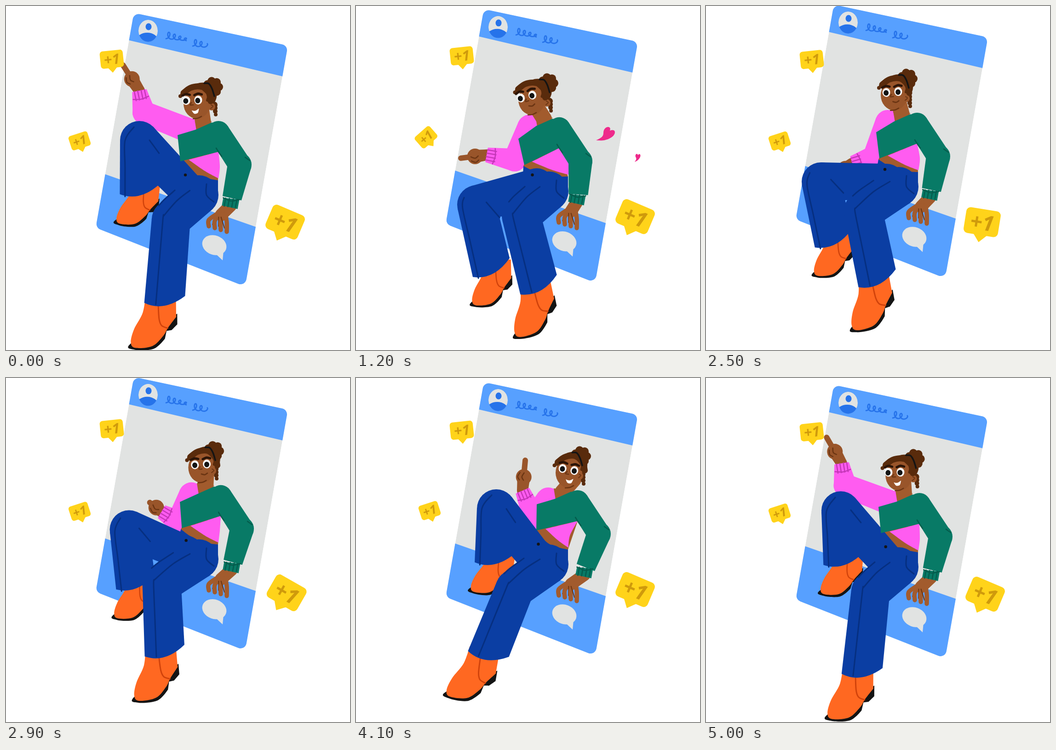
These frames come from a looping animation (748 by 748 pixels, 5100 ms). An HTML page with a canvas:

```html
<!DOCTYPE html>
<html lang="en">
<head>
<meta charset="utf-8">
<title>Stepping out of the feed</title>
<style>
html, body { margin: 0; width: 100%; height: 100%; overflow: hidden; background: #fff; }
canvas { display: block; width: 100vw; height: 100vh; }
</style>
</head>
<body>
<canvas id="stage" width="748" height="748"></canvas>
<script>
const ctx = document.getElementById('stage').getContext('2d');
const LOOP = 5100, STEP = 100, TAU = Math.PI * 2, DEG = Math.PI / 180;
const C = {
  blue: '#57a0ff', ink: '#2673ea', grey: '#e1e3e2', yellow: '#ffd31a', gold: '#cf9a0c',
  jeans: '#0b3ea3', seam: '#062f80', green: '#087a66', pine: '#045c4c', pink: '#ff5cf0',
  plum: '#c436b8', skin: '#a25b2d', face: '#99552a', crease: '#6b3513', hair: '#592b0c',
  dark: '#2b1407', black: '#141414', boot: '#ff6821', stitch: '#d1430b', heart: '#ee2a8b'
};

// ---- key joints, relative to the card; everything else follows from them ----
const tracks = {};
function pose(time, joints) {
  for (const name in joints) (tracks[name] ??= []).push([time, joints[name]]);
}
// head: x, sideways turn, tilt in degrees
pose(0, {
  chest: [462], head: [415, -10, -2], elbow: [300, 232], wrist: [290, 184], tip: [254, 128],
  nearHem: [345, 638], farKnee: [290, 292], farHem: [291, 398]
});
pose(500, { farKnee: [258, 355], farHem: [172, 482] });
pose(1200, {
  chest: [442], head: [382, -11, -14], elbow: [345, 343], wrist: [284, 332], tip: [228, 339],
  nearHem: [397, 614], farKnee: [262, 440], farHem: [294, 577]
});
pose(2000, {
  chest: [448], head: [392, -11, -12], elbow: [362, 348], wrist: [312, 368], tip: [270, 400],
  nearHem: [397, 608], farKnee: [266, 448], farHem: [286, 586]
});
pose(2500, {
  chest: [459], head: [409, -4, -4], elbow: [366, 346], wrist: [318, 360], tip: [285, 386],
  nearHem: [372, 610], farKnee: [250, 400], farHem: [277, 523]
});
pose(3300, {
  chest: [474], head: [441, -1, -3], elbow: [383, 314], wrist: [357, 259], tip: [340, 196],
  nearHem: [319, 610], farKnee: [292, 302], farHem: [289, 410]
});
pose(4100, {
  chest: [482], head: [463, -1, 10], elbow: [387, 311], wrist: [362, 251], tip: [368, 185],
  nearHem: [288, 606], farKnee: [305, 290], farHem: [302, 397]
});

// Periodic cubic interpolation that stays flat at turning points.
function sample(name, t) {
  const keys = tracks[name], n = keys.length;
  const keyAt = i => {
    const turn = Math.floor(i / n), [time, values] = keys[i - turn * n];
    return [time + turn * LOOP, values];
  };
  let i = n - 1;
  while (keys[i][0] > t) i--;
  const [a, b, c, d] = [-1, 0, 1, 2].map(k => keyAt(i + k));
  const span = c[0] - b[0], u = (t - b[0]) / span, v = 1 - u;
  const slope = (p, q, r, j) =>
    (q[1][j] - p[1][j]) * (r[1][j] - q[1][j]) > 0 ? (r[1][j] - p[1][j]) * span / (r[0] - p[0]) : 0;
  return b[1].map((from, j) =>
    from * (1 + 2 * u) * v * v + slope(a, b, c, j) * u * v * v +
    c[1][j] * u * u * (3 - 2 * u) - slope(b, c, d, j) * u * u * v);
}

// ---- helpers ----
const mix = (a, b, k) => [a[0] + (b[0] - a[0]) * k, a[1] + (b[1] - a[1]) * k];
const add = (a, x, y) => [a[0] + x, a[1] + y];
const along = (a, dir, k) => [a[0] + dir[0] * k, a[1] + dir[1] * k];
const normal = dir => [-dir[1], dir[0]];
function unit(a, b) {
  const dx = b[0] - a[0], dy = b[1] - a[1], len = Math.hypot(dx, dy) || 1;
  return [dx / len, dy / len];
}
function curve(pts, corners, closed) {
  const n = pts.length;
  const at = i => closed ? pts[(i + n) % n] : pts[Math.max(0, Math.min(n - 1, i))];
  const handle = (i, sign) => {
    const k = corners.includes(i % n) ? 0 : sign / 6;
    return add(at(i), (at(i + 1)[0] - at(i - 1)[0]) * k, (at(i + 1)[1] - at(i - 1)[1]) * k);
  };
  ctx.beginPath();
  ctx.moveTo(...pts[0]);
  for (let i = 0; i < (closed ? n : n - 1); i++)
    ctx.bezierCurveTo(...handle(i, 1), ...handle(i + 1, -1), ...at(i + 1));
}
function blob(pts, color, corners = []) {
  curve(pts, corners, true);
  ctx.fillStyle = color;
  ctx.fill();
}
function line(pts, color, width) {
  curve(pts, [], false);
  ctx.strokeStyle = color;
  ctx.lineWidth = width;
  ctx.stroke();
}
function poly(pts, color) {
  ctx.beginPath();
  pts.forEach(p => ctx.lineTo(...p));
  ctx.closePath();
  ctx.fillStyle = color;
  ctx.fill();
}
function oval(x, y, rx, ry, color, turn = 0) {
  ctx.beginPath();
  ctx.ellipse(x, y, rx, ry, turn, 0, TAU);
  ctx.fillStyle = color;
  ctx.fill();
}
const dot = (p, r, color) => oval(...p, r, r, color);
// Tapering limb segment: round at a, flat at b.
function limb(a, ra, b, rb, color) {
  const n = normal(unit(a, b));
  dot(a, ra, color);
  poly([along(a, n, ra), along(b, n, rb), along(b, n, -rb), along(a, n, -ra)], color);
}
function placed(x, y, degrees, scale, draw) {
  ctx.save();
  ctx.translate(x, y);
  ctx.rotate(degrees * DEG);
  ctx.scale(scale, scale);
  draw();
  ctx.restore();
}

// ---- scenery ----
function scrawl(x, y, humps) {
  const pts = [];
  for (let u = 0; u <= humps; u += .1)
    pts.push([x + 12 * u + 5 * Math.sin(TAU * u), y + 2.7 * u + (8 - 1.5 * u) * Math.cos(TAU * u)]);
  line(pts, C.ink, 2.8);
}
function card() {
  ctx.save();
  const corners = [[278, 15], [613, 86], [520, 610], [195, 482]];
  ctx.beginPath();
  ctx.moveTo(...mix(corners[3], corners[0], .5));
  corners.forEach((p, i) => ctx.arcTo(...p, ...corners[(i + 1) % 4], 13));
  ctx.closePath();
  ctx.clip();
  ctx.fillStyle = C.grey;
  ctx.fill();
  poly([[150, -40], [700, -40], [700, 176], [150, 47]], C.blue);
  poly([[150, 343], [700, 535], [700, 700], [150, 700]], C.blue);
  scrawl(348, 63, 4);
  scrawl(406, 79, 2.5);
  oval(453, 520, 27, 21, C.grey, .35);
  poly([[457, 540], [473, 532], [471, 553]], C.grey);
  ctx.beginPath();
  ctx.ellipse(309, 54, 21, 24, 0, 0, TAU);
  ctx.clip();
  ctx.fillStyle = C.grey;
  ctx.fill();
  oval(307, 76, 24, 18, C.ink);
  oval(310, 45, 6.5, 7.5, C.ink);
  ctx.restore();
}
function badge(x, y, degrees, scale) {
  placed(x, y, degrees, scale, () => {
    ctx.fillStyle = C.yellow;
    ctx.beginPath();
    ctx.roundRect(-36, -27, 72, 54, 9);
    ctx.fill();
    poly([[-15, 25], [15, 25], [-1, 42]], C.yellow);
    ctx.fillStyle = C.gold;
    ctx.font = 'italic 600 44px "Noto Sans", sans-serif';
    ctx.textAlign = 'center';
    ctx.fillText('+1', 0, 16);
  });
}
function badges(t) {
  const bob = peak => Math.cos(TAU * (t - peak) / (LOOP / 2)) - 1;
  const pulse = (center, width) => Math.exp(-(((t - center) / width) ** 2));
  const left = pulse(1250, 280);
  const right = pulse(2550, 190) - .9 * pulse(3050, 190);
  badge(230, 119 + 6.5 * bob(2120), -6, .7);
  badge(160 - 8 * left, 294 + 4.5 * bob(2300), -18 - 24 * left, .6);
  badge(607 - 7 * right, 470 + 6 * bob(2480), 23 - 15 * right, 1.05);
}
function heart(x, y, degrees, scale) {
  placed(x, y, degrees, scale, () => {
    ctx.beginPath();
    ctx.moveTo(-21, 14);
    ctx.bezierCurveTo(-10, 9, -5, 6, -5, -2);
    ctx.bezierCurveTo(-5, -18, 14, -19, 9, -7);
    ctx.bezierCurveTo(24, -13, 23, 3, 10, 9);
    ctx.bezierCurveTo(0, 15, -10, 15, -21, 14);
    ctx.fillStyle = C.heart;
    ctx.fill();
  });
}
function hearts(t) {
  const age = (t - 900) / 800;
  if (age <= 0 || age >= 1) return;
  const size = Math.min(1, 2 * Math.sin(Math.PI * age)), rise = (1200 - t) * .04;
  heart(543, 278 + rise, 0, size);
  heart(611, 329 + rise, -30, .45 * size);
}

// ---- figure ----
function boot(ankle, degrees, scale) {
  placed(...ankle, degrees, scale, () => {
    blob([[-61, 82], [-54, 96], [-12, 93], [12, 70], [15, 53], [26, 51], [38, 38], [37, 15]], C.black, [3, 4, 5, 6, 7]);
    blob([[-33, -24], [-38, 15], [-56, 52], [-62, 80], [-52, 92], [-15, 87], [8, 64], [18, 46], [35, 22], [33, -24]], C.boot, [0, 8, 9]);
    line([[-5, -4], [-2, 28], [4, 42], [17, 47]], C.stitch, 3);
  });
}
function bootUnder(knee, hem, shift, reach, turn, scale) {
  const shin = unit(knee, hem);
  const degrees = Math.atan2(-shin[0], shin[1]) / DEG;
  boot(add(along(hem, shin, reach), shift, 0), .6 * degrees + turn, scale);
}
// seamAt: how far towards the front edge the seam runs, 0 to 1
function leg(hip, hipRadius, knee, hem, seamAt) {
  const radius = 42, half = 45;
  const thighFront = normal(unit(hip, knee)), shin = unit(knee, hem), front = normal(shin);
  const slant = -14 * DEG, cos = Math.cos(slant), sin = Math.sin(slant);
  const edge = [front[0] * cos - front[1] * sin, front[0] * sin + front[1] * cos];
  const hemFront = along(hem, edge, half), hemBack = along(hem, edge, -half);
  const kneeBack = along(knee, front, -radius);

  limb(hip, hipRadius, knee, radius, C.jeans);
  dot(knee, radius, C.jeans);
  ctx.beginPath();
  ctx.moveTo(...along(knee, front, radius));
  ctx.lineTo(...hemFront);
  ctx.quadraticCurveTo(...along(hem, shin, 28), ...hemBack);
  ctx.lineTo(...kneeBack);
  ctx.fillStyle = C.jeans;
  ctx.fill();

  const offset = radius * seamAt;
  const bend = unit([0, 0], add(thighFront, ...front));
  line([along(knee, bend, offset), along(knee, front, offset),
    mix(along(knee, front, offset), along(hem, edge, half * seamAt), .5),
    along(along(hem, edge, half * seamAt), shin, 8)], C.seam, 3);
  return { thighFront, bend, kneeBack, hemBack, front, offset };
}
function farLeg(hip, knee, hem) {
  const { front, kneeBack, hemBack } = leg(hip, 38, knee, hem, .74);
  line([along(knee, front, -22), mix(kneeBack, hemBack, .3)], C.seam, 3);
}
function nearLeg(hip, waist, side, knee, hem) {
  const belt = add(mix(waist, side, .5), -3, 9);
  blob([waist, belt, side, add(hip, 42, 0), add(hip, 0, 40), add(hip, -58, 15)], C.jeans, [0, 2, 3, 4, 5]);
  const { thighFront, bend, offset } = leg(hip, 43, knee, hem, .42);
  const thighAt = (k, d) => along(mix(hip, knee, k), thighFront, d);
  line([thighAt(.1, 20), thighAt(.55, 22), along(knee, bend, offset)], C.seam, 3);
  line([thighAt(.4, 42), thighAt(.8, 42), along(knee, thighFront, 40)], C.seam, 3);
  line([add(side, -25, 8), add(side, -25, 32), add(side, -9, 47)], C.seam, 3);
  dot(add(belt, -26, -1), 3.2, C.black);
}
function ribs(a, b, dir, length, color) {
  [.15, .38, .62, .85].forEach(k => line([mix(a, b, k), along(mix(a, b, k), dir, length)], color, 2.5));
}
function farArm(shoulder, elbow, wrist, tip) {
  const point = unit(wrist, tip), across = normal(point), fist = mix(wrist, tip, .45);
  limb(wrist, 12, fist, 14, C.face);
  dot(fist, 17, C.face);
  line([fist, mix(fist, tip, .5), tip], C.face, 12);
  [-9, 0].forEach(k => {
    const knuckle = along(fist, across, k);
    line([along(knuckle, point, 9), along(knuckle, across, -4), along(knuckle, point, -7)], C.crease, 2.5);
  });
  limb(shoulder, 27, elbow, 25, C.pink);
  limb(elbow, 25, wrist, 16, C.pink);
  const up = unit(wrist, elbow), side = normal(up);
  ribs(along(wrist, side, 16), along(wrist, side, -16), up, 20, C.plum);
  const inner = along(wrist, up, 16);
  line([along(inner, side, 17), along(inner, up, 3), along(inner, side, -17)], C.plum, 2.5);
}
function nearHand(cuff, palm) {
  line([add(cuff, -3, 16), palm], C.skin, 27);
  for (let i = 0; i < 4; i++) {
    const x = -27 + 13 * i, y = 25 + 4 * i;
    line([add(palm, -9 + 6 * i, -2), add(palm, x, y * .45), add(palm, x, y)], C.skin, 9.5);
    if (i < 3) line([add(palm, x * .4, 5), add(palm, x + 8, y - 4)], C.crease, 2);
  }
}
function wrapTop(chest, waist, cuff, palm) {
  const elbow = add(chest, 46, 71), armpit = add(chest, 0, 43);
  nearHand(cuff, palm);
  limb(chest, 24, elbow, 25, C.green);
  limb(elbow, 26, cuff, 21, C.green);
  poly([[chest[0] - 89, waist[1] - 59], add(chest, -50, -5), add(chest, -14, -21), add(chest, 10, 10),
    armpit, add(waist, 2, -2)], C.green);
  const left = add(cuff, -19, -1), right = add(cuff, 16, 3), down = [-.18, .98];
  poly([left, right, along(right, down, 21), along(left, down, 17)], C.green);
  ribs(left, right, down, 18, C.pine);
  line([left, add(cuff, -2, 6), right], C.pine, 2.5);
  line([add(armpit, -5, -8), armpit, add(armpit, 7, 10)], C.pine, 2.5);
  line([add(elbow, 12, -16), add(elbow, 22, -9)], C.pine, 2.5);
}
function belly(chest, waist, hip, side) {
  const armpit = add(chest, 0, 43), hem = mix(waist, armpit, .24);
  poly([add(waist, 2, -4), armpit, side, hip, waist], C.skin);
  blob([hem, armpit, add(side, 4, -30), add(side, 1, -4), mix(hem, side, .55)], C.pink, [0, 1, 3]);
}
function head(x, turn, tilt, chest, t) {
  const o = [x, 209], bun = add(o, 25 - turn, -33), eyes = add(o, turn, -4);
  const at = (dx, dy) => add(o, dx, dy);
  poly([add(chest, -52, -28), add(chest, -14, -23), add(chest, -48, -3)], C.skin);
  line([at(10, 18), add(chest, -33, -20)], C.skin, 34);
  for (let i = 0; i < 7; i++)
    dot(add(bun, 13 * Math.cos(i / 7 * TAU), 13 * Math.sin(i / 7 * TAU)), 9, C.hair);
  dot(bun, 15, C.hair);
  oval(...add(mix(o, bun, .35), 0, -3), 31, 28, C.hair);
  for (let i = 0; i < 4; i++) dot(at(28 - turn + i, 6 + 7 * i), 7 - i, C.hair);
  oval(...at(0, 3), 29, 33, C.face);
  line([at(-8, 36), at(2, 35), at(10, 31)], C.crease, 2.5);
  dot(at(22 - turn, 10), 8, C.face);
  line([at(21 - turn, 6), at(25 - turn, 9), at(20 - turn, 14)], C.crease, 2);

  const slide = (turn + 10) * .5;
  line([at(slide - 29, -20), at(slide - 14, -31), at(slide + 6, -34), at(slide + 24, -26), at(slide + 30, -2)], C.hair, 13);
  for (let i = 0; i < 4; i++) dot(at(slide - 36 + 5 * i, -13 - 4 * i), 4 + i % 2, C.hair);
  line([at(slide + 14, -28), at(slide + 25, -16), at(slide + 23, -4)], C.hair, 6);
  line([add(bun, -19, -8), add(bun, -9, -7), add(bun, -2, 4), add(bun, 3, 20)], C.black, 3.5);

  const blink = t >= 3200 && t < 3450, grin = t < 600 || t >= 3700;
  placed(...eyes, tilt, 1, () => {
    [-13, 13].forEach(x => {
      const lift = blink ? 5 : 0;
      if (blink) line([[x - 8, -1], [x, 2], [x + 8, -1]], C.dark, 2.5);
      else {
        oval(x, 0, 8.5, 9.5, '#fff');
        oval(x + turn * .12, 1, 5.5, 6, C.black);
      }
      line([[x - 8, -11 + lift], [x, -14 + lift], [x + 8, -12 + lift]], C.dark, 5);
    });
    line([[-2, 5], [-5, 10], [2, 10]], C.crease, 2.5);
    if (grin) blob([[-2, 22], [6, 23], [14, 18], [11, 28], [3, 29]], '#fff', [0, 2]);
    else line([[0, 21], [7, 23], [13, 20]], C.crease, 2.8);
  });
}
function figure(t) {
  const get = name => sample(name, t);
  const chest = [get('chest')[0], 274], hip = [419, 411], side = add(hip, 42, -32);
  const farKnee = get('farKnee'), farHem = get('farHem'), nearHem = get('nearHem');
  const nearKnee = [350 + 12 * Math.cos(TAU * (t - 600) / LOOP), 464];
  // The waist follows the lean of the chest and the lift of the far knee.
  const waist = [364 + .65 * (chest[0] - 442), 340 + .11 * (farKnee[1] - 295)];
  const cuff = [491 + .4 * (chest[0] - 461), 418];

  farArm(add(chest, -64, -3), get('elbow'), get('wrist'), get('tip'));
  belly(chest, waist, hip, side);
  head(...get('head'), chest, t);
  bootUnder(farKnee, farHem, 13, 3, 9, .87);
  farLeg(add(hip, -26, -12), farKnee, farHem);
  bootUnder(nearKnee, nearHem, -8, 15, -1, 1);
  nearLeg(hip, waist, side, nearKnee, nearHem);
  wrapTop(chest, waist, cuff, [468, 454]);
}

const start = performance.now();
function frame() {
  const elapsed = (performance.now() - start) % LOOP;
  const t = Math.floor(elapsed / STEP) * STEP;
  ctx.fillStyle = '#fff';
  ctx.fillRect(0, 0, 748, 748);
  ctx.lineCap = ctx.lineJoin = 'round';
  placed(0, 9 * Math.cos(TAU * t / LOOP) - 9, 0, 1, () => {
    card();
    figure(t);
  });
  hearts(t);
  badges(t);
  requestAnimationFrame(frame);
}
frame();
</script>
</body>
</html>
```
